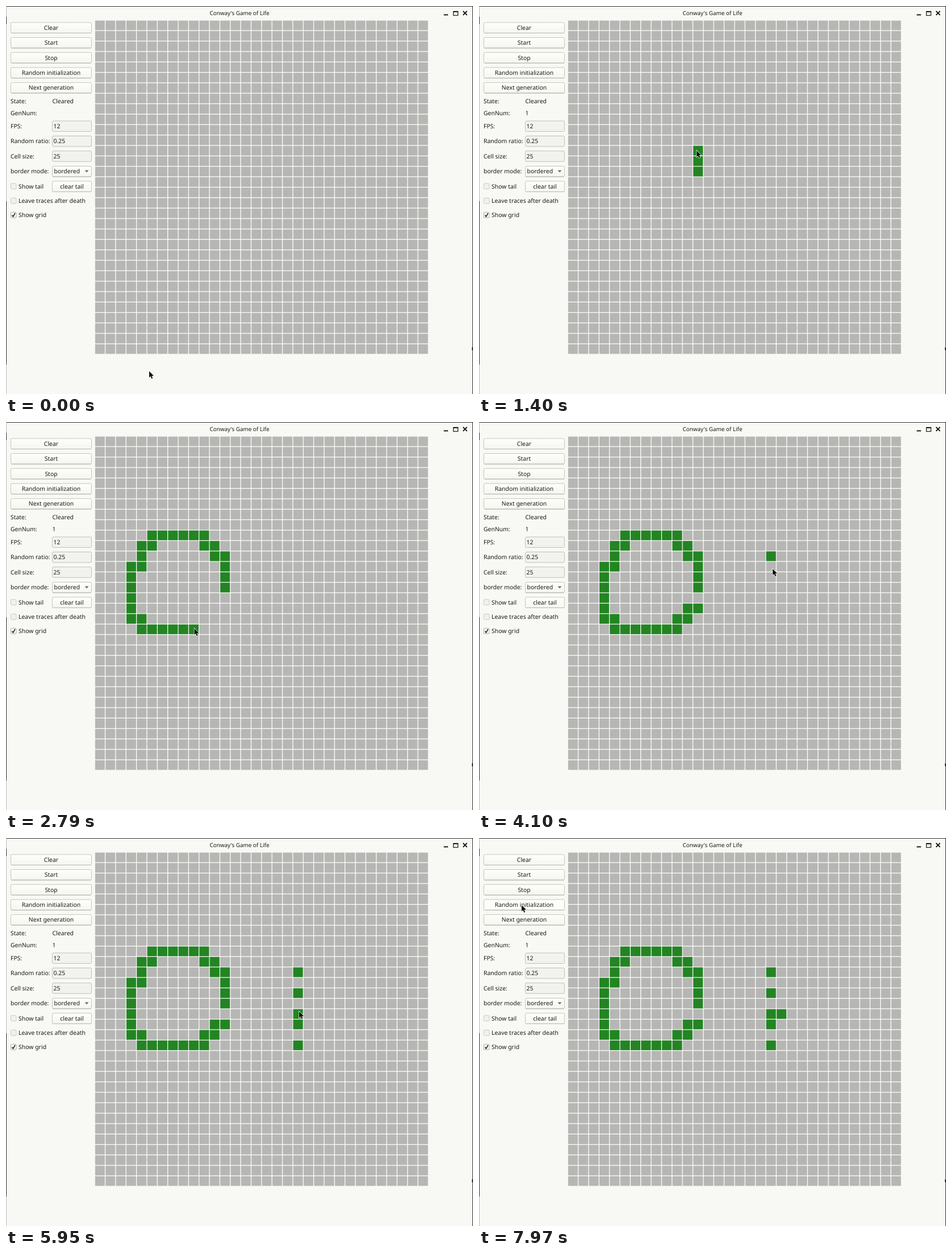
An HTML page with a canvas for the animation above (8 s loop, 822 by 682 pixels).

```html
<!DOCTYPE html>
<html lang="en">
<head>
<meta charset="utf-8">
<title>Conway's Game of Life</title>
<style>
html, body { margin: 0; width: 100%; height: 100%; overflow: hidden; background: #f8f9f4; }
canvas { display: block; }
</style>
</head>
<body>
<canvas id="stage" width="822" height="682"></canvas>
<script>
const ctx = document.getElementById('stage').getContext('2d');
const LOOP = 8000, N = 32, PITCH = 18.35, LEFT = 156.9, TOP = 25.6, SIZE = 17;
const ROW = 26.4, INK = '#191b1a', EDGE = '#c4c5ba', DARK = '#30312f';
const STROKE_START = 1300, STROKE_STEP = 51;

// The drawn ring: one cell per direction, starting at column 12, row 14
const step = { U: [0, -1], D: [0, 1], L: [-1, 0], R: [1, 0] };
const ring = [[12, 14]];
for (const d of 'UUULULULLLLLDLDDLDDDDDRDRRRRRRURUR') {
  const [c, r] = ring[ring.length - 1];
  ring.push([c + step[d][0], r + step[d][1]]);
}
const STROKE_END = STROKE_START + (ring.length - 1) * STROKE_STEP;

// Single clicks: column, row, time
const clicks = [[19, 11, 3900], [19, 13, 4400], [19, 18, 4820], [19, 16, 5100], [19, 15, 5800], [20, 15, 6450]];

// Pointer moves outside the ring stroke: time, x, y of the tip
const before = [[140, 252, 642], [670, 337, 319], [1000, 382, 289], [STROKE_START, 381, 289]];
const after = [
  [STROKE_END, 386, 326], [3410, 400, 312], [3820, 513, 237], [4100, 517, 258],
  [4680, 513, 358], [4820, 513, 358], [5100, 514, 318], [5450, 515, 358],
  [5950, 516, 305], [6230, 518, 296], [6820, 534, 312], [6960, 534, 312],
  [7730, 96, 137], [7970, 75, 118]
];

const mix = (a, b, k) => a + (b - a) * k;

function along(keys, t) {
  const i = keys.findIndex(k => k[0] > t);
  if (i < 1) return (i ? keys[keys.length - 1] : keys[0]).slice(1);
  const a = keys[i - 1], b = keys[i], k = (t - a[0]) / (b[0] - a[0]);
  return [mix(a[1], b[1], k), mix(a[2], b[2], k)];
}

// Average of the stroke around index u, which rounds its corners
function onRing(u) {
  const sum = [0, 0];
  for (let d = -1; d <= 1; d += 0.5) {
    const v = Math.min(Math.max(u + d, 0), ring.length - 1.001);
    const i = Math.floor(v);
    [0, 1].forEach(n => { sum[n] += mix(ring[i][n], ring[i + 1][n], v - i) / 5; });
  }
  return [LEFT + sum[0] * PITCH + 6, TOP + sum[1] * PITCH + 8];
}

function pointerAt(t) {
  if (t < STROKE_START) return along(before, t);
  return t < STROKE_END ? onRing((t - STROKE_START) / STROKE_STEP) : along(after, t);
}

function rect(x, y, w, h, color) {
  ctx.fillStyle = color;
  ctx.fillRect(x, y, w, h);
}

function text(s, x, y, align = 'left', size = 10.45) {
  ctx.font = size + 'px "Noto Sans", "Open Sans", sans-serif';
  ctx.textAlign = align;
  ctx.fillStyle = INK;
  ctx.fillText(s, x, y + size * 0.36);
}

function trace(points) {
  ctx.beginPath();
  points.forEach(([x, y]) => ctx.lineTo(x, y));
}

function line(points, width, color = INK) {
  trace(points);
  ctx.lineWidth = width;
  ctx.strokeStyle = color;
  ctx.stroke();
}

function box(x, y, w, h, fill, edge = EDGE, radius = 2) {
  ctx.beginPath();
  ctx.roundRect(x, y, w, h, radius);
  ctx.fillStyle = fill;
  ctx.fill();
  ctx.lineWidth = 1;
  ctx.strokeStyle = edge;
  ctx.stroke();
}

function button(s, x, y, w, hover) {
  const shade = ctx.createLinearGradient(0, y - 9, 0, y + 9);
  shade.addColorStop(0, '#fefefb');
  shade.addColorStop(1, hover ? '#fcfcf8' : '#f5f6f0');
  box(x, y - 9, w, 18.5, shade);
  line([[x + 1, y + 9.5], [x + w - 1, y + 9.5]], 1, '#b3b4aa');
  text(s, x + w / 2, y, 'center');
}

function checkbox(s, y, checked) {
  box(8.5, y - 5, 9.5, 9.5, checked ? '#fcfcf8' : '#f1f2ee', checked ? '#a9aaa2' : '#c9cac2', 1);
  if (checked) line([[10.5, y], [12.5, y + 2.5], [16, y - 3.5]], 1.6);
  text(s, 22, y);
}

function chrome() {
  rect(0, 0, 822, 682, '#f8f9f4');
  rect(0, 0, 822, 1, DARK);
  rect(821, 0, 1, 682, DARK);
  rect(820, 600, 2, 5, DARK);
  rect(0, 0, 1, 682, '#b9bab5');
  rect(0, 19, 1, 13, DARK);
  rect(0, 343, 1, 287, DARK);
  text("Conway's Game of Life", 411, 12.7, 'center', 9.9);
  line([[770.5, 15.5], [778, 15.5]], 2);
  ctx.lineWidth = 1.2;
  ctx.strokeRect(787.5, 9.5, 8, 7);
  line([[787, 10], [796, 10]], 2);
  line([[804.5, 9], [811.5, 16]], 1.8);
  line([[811.5, 9], [804.5, 16]], 1.8);
}

function panel(t, x, y) {
  ['Clear', 'Start', 'Stop', 'Random initialization', 'Next generation'].forEach((s, i) => {
    const cy = 38 + i * ROW;
    button(s, 8.5, cy, 142, x > 8 && x < 150 && Math.abs(y - cy) < 10);
  });
  text('State:', 8, 167.3);
  text('Cleared', 81.5, 167.3);
  text('GenNum:', 8, 187.8);
  if (t >= STROKE_START) text('1', 81.5, 187.8);
  [['FPS:', '12'], ['Random ratio:', '0.25'], ['Cell size:', '25']].forEach(([s, v], i) => {
    const cy = 211.3 + i * ROW;
    text(s, 8, cy);
    box(81.5, cy - 9.3, 69, 18.5, '#f2f3ee', '#bebfb5');
    text(v, 83.5, cy);
  });
  text('border mode:', 8, 290.5);
  button('', 81.5, 290.5, 69);
  text('bordered', 84.5, 290.5);
  trace([[138.5, 288.8], [145.5, 288.8], [142, 292.5]]);
  ctx.fillStyle = '#6b6c48';
  ctx.fill();
  checkbox('Show tail', 317, false);
  button('clear tail', 81.5, 317, 69);
  checkbox('Leave traces after death', 342.6, false);
  checkbox('Show grid', 367.7, true);
}

function cell(c, r, color) {
  rect(LEFT + c * PITCH, TOP + r * PITCH, SIZE, SIZE, color);
}

function board(t) {
  rect(LEFT, TOP, N * PITCH - 1.3, N * PITCH - 1.3, '#fbfbf7');
  for (let r = 0; r < N; r++) for (let c = 0; c < N; c++) cell(c, r, '#b6b6b5');
  const alive = (c, r) => cell(c, r, '#228522');
  ring.forEach(([c, r], i) => { if (t >= STROKE_START + (i - 0.5) * STROKE_STEP) alive(c, r); });
  clicks.forEach(([c, r, at]) => { if (t >= at) alive(c, r); });
}

function pointer(x, y) {
  ctx.save();
  ctx.translate(x, y);
  trace([[0, 0], [0, 11], [2.5, 8.8], [4.3, 13], [6.2, 12.2], [4.5, 8.2], [8, 8]]);
  ctx.closePath();
  ctx.lineWidth = 1.4;
  ctx.strokeStyle = '#f4f4f0';
  ctx.stroke();
  ctx.fillStyle = '#101010';
  ctx.fill();
  ctx.restore();
}

function draw(now) {
  const t = Math.max(0, now) % LOOP;
  const [x, y] = pointerAt(t);
  ctx.textRendering = 'geometricPrecision';
  chrome();
  panel(t, x, y);
  board(t);
  pointer(x, y);
  requestAnimationFrame(draw);
}
requestAnimationFrame(draw);
</script>
</body>
</html>
```
